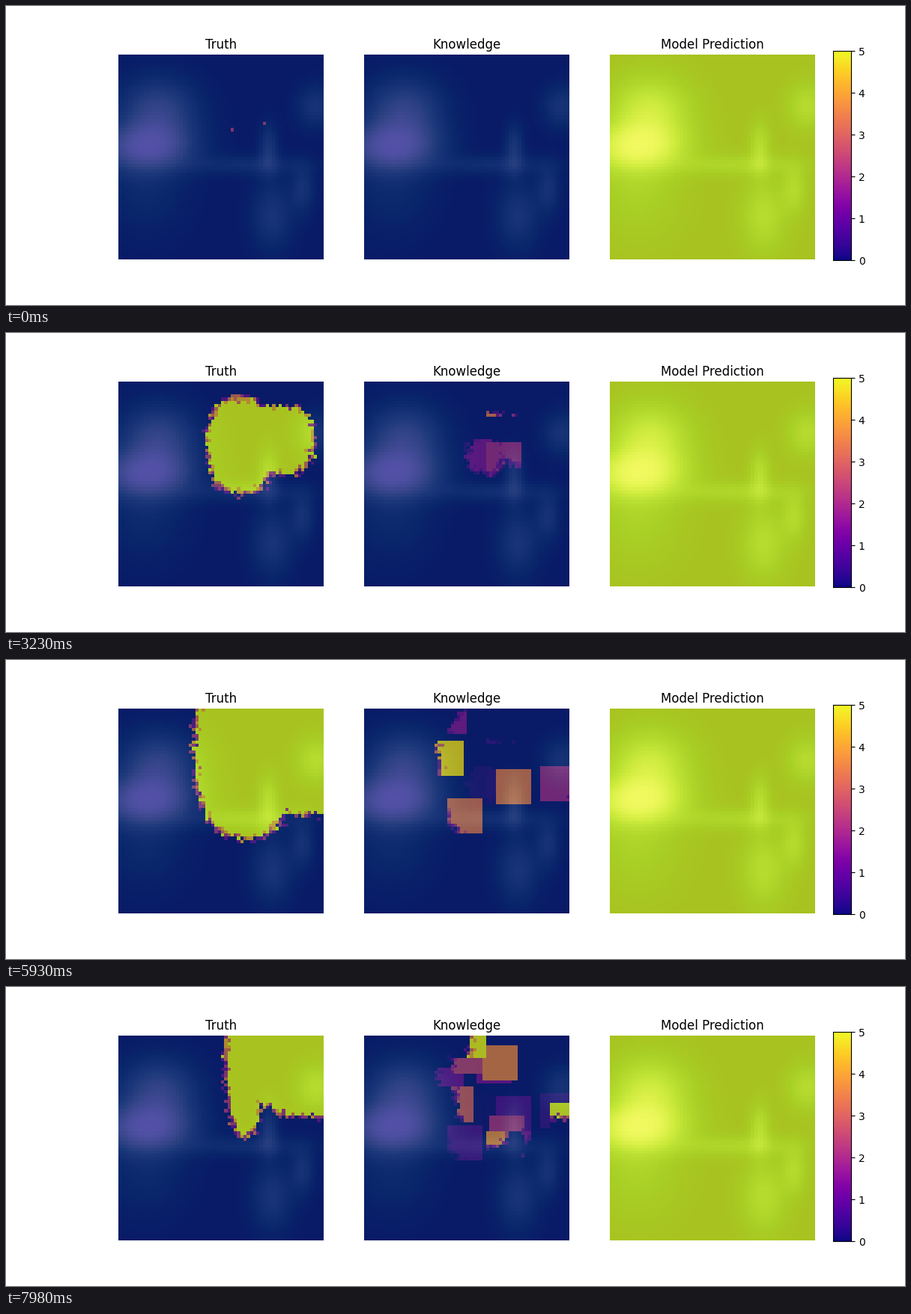
A matplotlib script for the animation above (8000 ms loop, 1200 px wide and 400 px high).

```python
import numpy as np
import matplotlib.pyplot as plt
from matplotlib.animation import FuncAnimation

N = 64                  # cells per side
CELL = 273.5 / N        # pixels per cell
LOOP, TICK = 8000, 20   # ms
START, STEP = 280, 50   # the simulation advances every STEP ms from START on
PEAK = 5300             # the front retreats after this time
VIEW = 11               # side of an observed square, in cells
FADE = 1400             # decay time of an observation, in ms
ALPHA = 0.7

plasma, greens = plt.get_cmap("plasma"), plt.get_cmap("Greens_r")
rows, cols = np.mgrid[0:N, 0:N]
px, py = 150 + (cols + 0.5) * CELL, 65.2 + (rows + 0.5) * CELL
noise = np.random.default_rng(7).normal(size=(N, N))

# Hills: x, y, spread x, spread y, height
HILLS = [
    (8, 28.5, 10, 5, 0.70), (12, 17.5, 8.5, 7.5, 0.54), (8, 40, 9, 11, 0.18),
    (40, 34, 13, 2.2, 0.22), (46.3, 29, 2.1, 5.5, 0.33),
    (47.5, 50, 4.7, 7.5, 0.31), (57, 41.5, 2.6, 5.2, 0.27), (61, 15.7, 4.2, 4.8, 0.30),
]
height = sum(a * np.exp(-((cols - x) / sx) ** 2 / 2 - ((rows - y) / sy) ** 2 / 2)
             for x, y, sx, sy, a in HILLS)
ground = greens(np.clip(height, 0, 1))[..., :3]

# Observations: time, first column, first row
VIEWS = [
    (1330, 31, 18), (1780, 38, 19), (2580, 38, 0), (4130, 21, -3),
    (4430, 55, 18), (5180, 26, 28), (5230, 41, 19), (5780, 20, 10),
    (5980, 35, 4), (6180, 41, 30), (6630, 39, 25), (6830, 27, 1),
    (7080, 23, 16), (7380, 37, 3), (7430, 38, 30), (7930, 27, -4), (7930, 58, 21),
]


def inside(left, right, top, bottom):
    """Approximate distance in cells to the edge of a rounded blob, positive inside."""
    dx = np.abs(px - (left + right) / 2) / ((right - left) / 2)
    dy = np.abs(py - (top + bottom) / 2) / ((bottom - top) / 2)
    rho = (dx ** 2.5 + dy ** 2.5) ** 0.4
    return (1 - rho) / (np.hypot(*np.gradient(rho)) + 1e-6)


def truth(t):
    """Intensity 0 to 5 of every cell at time t."""
    if t < START:
        field = np.zeros((N, N))
        field[23, 35] = field[21, 45] = 2
        if t >= 110:
            field[22, 36] = 1
        return field
    grow = min(t / PEAK, 1)
    wind = (t / PEAK) ** 1.3
    back = 0.00033 * max(t - PEAK, 0) ** 1.5
    west = inside(302 - 56 * grow + back, 304 + 88 * grow - back,
                  163 - 145 * wind, 167 + 77 * grow - back)
    east = inside(343 - 45 * grow, 347 + 120 * wind,
                  155 - 110 * wind, 157 + 54 * grow - 0.8 * back)
    return np.clip(np.round(3 * np.maximum(west, east) + 2.5 + 2 * noise), 0, 5)


def window(col, row):
    return slice(max(row, 0), row + VIEW), slice(max(col, 0), col + VIEW)


SNAPS = [(t, window(c, r), truth(t)[window(c, r)]) for t, c, r in VIEWS]


def knowledge(t):
    field = np.zeros((N, N))
    for seen, area, values in SNAPS:
        if seen <= t:
            field[area] = values * np.exp((seen - t) / FADE)
    return field


def shade(field):
    mix = ALPHA * plasma(field / 5)[..., :3] + (1 - ALPHA) * ground
    return np.round(mix * 255).astype(np.uint8)


fig, axes = plt.subplots(1, 3, figsize=(12, 4), dpi=100)
images = []
for ax, title, value in zip(axes, ["Truth", "Knowledge", "Model Prediction"], [0, 0, 5]):
    images.append(ax.imshow(shade(np.full((N, N), float(value))), interpolation="nearest"))
    ax.set_title(title)
    ax.axis("off")

bar = fig.add_axes([0.92, 0.15, 0.02, 0.7])
bar.imshow(np.linspace(0, 1, 256)[:, None], cmap=plasma, origin="lower",
           extent=(0, 1, 0, 5), aspect="auto")
bar.set_xticks([])
bar.set_yticks(range(6))
bar.yaxis.tick_right()


def update(i):
    t = i * TICK + TICK / 2
    if t >= START:
        t = START + (t - START) // STEP * STEP
    images[0].set_data(shade(truth(t)))
    images[1].set_data(shade(knowledge(t)))
    return images[:2]


anim = FuncAnimation(fig, update, frames=LOOP // TICK, interval=TICK,
                     repeat=True, repeat_delay=0, blit=False)
plt.show()
```
